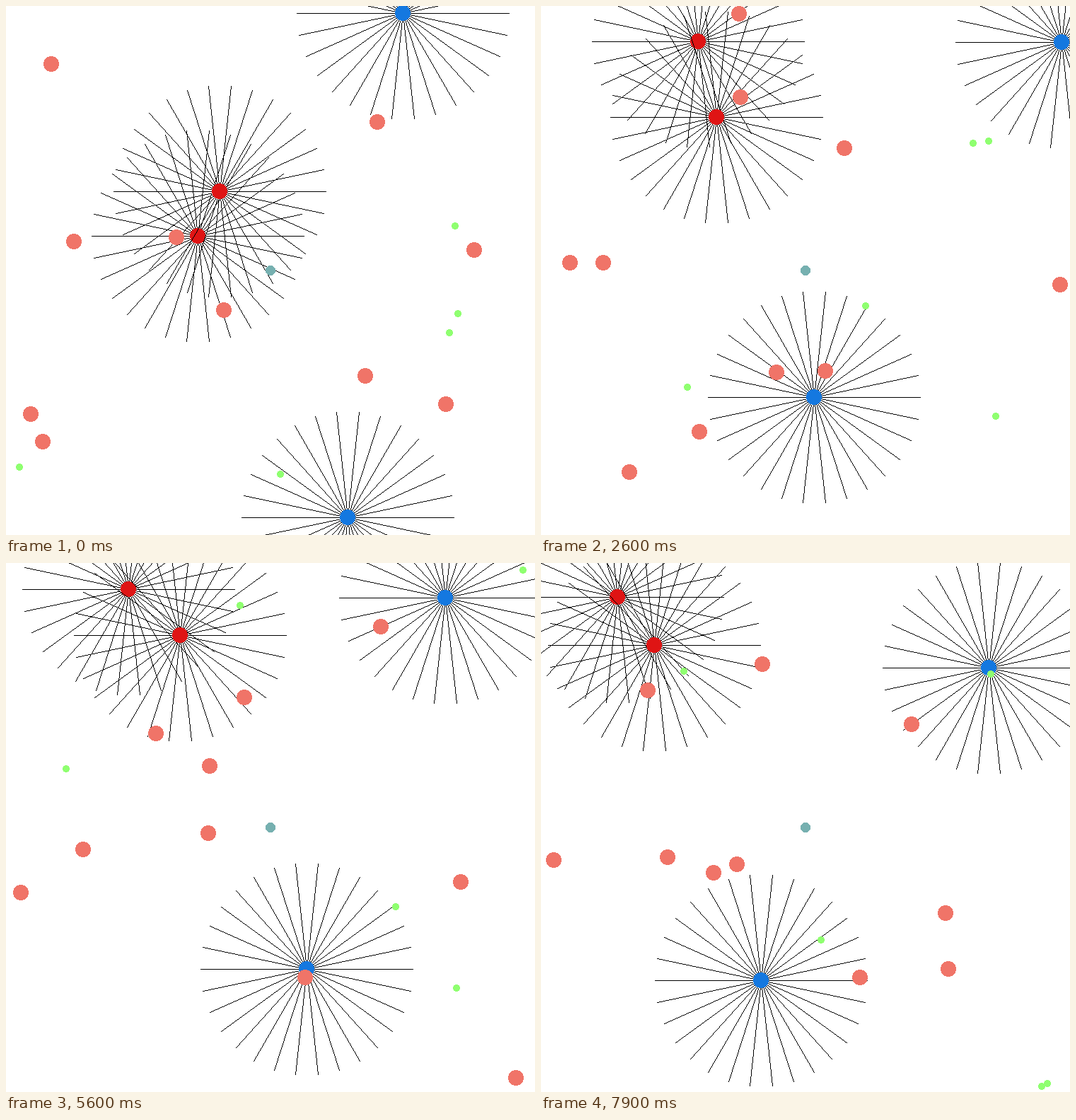
Animation of 748 by 748 pixels, one loop 8 s. Source, as a matplotlib script:

```python
import numpy as np
import matplotlib.pyplot as plt
from matplotlib.animation import FuncAnimation
from matplotlib.colors import to_rgb

SIZE, DPI = 748, 100
FRAMES, STEP_MS = 80, 100
SUBSTEPS = 2
CENTER = np.array([374.0, 374.0])
SHIELD = 75          # bounce distance around the centre dot
RAYS, REACH = 30, 150

RED, BLUE = "#df1414", "#1478e0"
SALMON, GREEN, TEAL = "#f07468", "#8fff70", "#76b0b0"

# Drifting dots: start and velocity, optionally the frame of a rebirth
# followed by the new start and velocity.
SALMON_DOTS = [
    (662, 345, 3.06, 1.9),
    (508, 523, -3.05, -12.38),
    (622, 563, -11.13, -1.74),
    (52, 616, 6.63, -0.53),
    (35, 577, -5.38, 9.23),
    (308, 430, -10.28, -2.56),
    (96, 333, 11.76, 7.05),
    (241, 327, -5.89, 1.4),
    (64, 82, 8.32, -2.72, 64, 171, 348, -10.2, 4.8),
    (525, 164, -9.36, -10.5, 28, 88, 360, 4.42, -4.26),
]
GREEN_DOTS = [
    (639, 435, -8.27, -1.11),
    (19, 652, 7.23, 11.44),
    (388, 662, 9.8, -3.14),
    (635, 311, 9.32, -4.49, 57, 574, 535, 6.1, 9.3),
    (627, 462, -11.6, 9.92, 19, 604, 236, 4.13, -6.42),
]

# Hunters glide through a few waypoints reached at shared times.
KEYS = np.array([0, 12, 26, 34, 47, 65, 79])
HUNTERS = [
    (BLUE, (561, 630, 736, 677, 652, 601, 633), (10, 20, 51, 24, 16, 99, 148)),
    (BLUE, (483, 400, 386, 355, 436, 401, 311), (723, 737, 553, 504, 609, 538, 590)),
    (RED, (271, 164, 222, 214, 142, 204, 108), (325, 179, 50, 104, 31, 45, 48)),
    (RED, (302, 246, 248, 327, 307, 184, 160), (262, 226, 157, 76, 80, 121, 116)),
]


def advance(pos, vel, radius):
    """One substep with elastic bounces off the walls and the centre shield."""
    pos = pos + vel / SUBSTEPS
    low, high = radius - 1, SIZE - radius + 1
    vel = np.where(pos < low, abs(vel), np.where(pos > high, -abs(vel), vel))
    pos = np.where(pos < low, 2 * low - pos,
                   np.where(pos > high, 2 * high - pos, pos))
    away = pos - CENTER
    dist = np.hypot(*away)
    inward = vel @ away / dist
    if dist < SHIELD + radius and inward < 0:
        vel = vel - 2 * inward * away / dist
    return pos, vel


def dot_track(spec, radius):
    births = {0: spec[:4]}
    if len(spec) > 4:
        births[spec[4]] = spec[5:]
    track = []
    for i in range(FRAMES):
        if i in births:
            pos, vel = np.array(births[i], float).reshape(2, 2)
        else:
            for _ in range(SUBSTEPS):
                pos, vel = advance(pos, vel, radius)
        track.append(pos)
    return np.rint(track).astype(int)


def glide(v):
    """Monotone cubic through the waypoints, sampled at every frame."""
    v = np.array(v, float)
    h = np.diff(KEYS)
    d = np.diff(v) / h
    m = np.concatenate([d[:1], np.zeros(len(d) - 1), d[-1:]])
    for k in range(1, len(d)):
        if d[k - 1] * d[k] > 0:
            m[k] = 2 * d[k - 1] * d[k] / (d[k - 1] + d[k])
    f = np.arange(FRAMES)
    k = np.clip(np.searchsorted(KEYS, f, side="right") - 1, 0, len(h) - 1)
    s = (f - KEYS[k]) / h[k]
    return ((1 + 2 * s) * (1 - s) ** 2 * v[k] + s * (1 - s) ** 2 * h[k] * m[k]
            + s * s * (3 - 2 * s) * v[k + 1] + s * s * (s - 1) * h[k] * m[k + 1])


def hunter_track(xs, ys):
    return np.rint(np.column_stack([glide(xs), glide(ys)])).astype(int)


def disc(radius):
    """Pixel offsets of a filled circle with an even diameter."""
    dy, dx = np.mgrid[-radius:radius, -radius:radius]
    inside = np.hypot(dx + 0.5, dy + 0.5) < radius
    return np.column_stack([dx[inside], dy[inside]])


def burst():
    """Pixel offsets of one-pixel rays around a point."""
    rays = []
    for a in 2 * np.pi * np.arange(RAYS) / RAYS:
        end = np.rint([REACH * np.cos(a), REACH * np.sin(a)])
        n = int(abs(end).max())
        rays.append(np.rint(np.outer(np.arange(n + 1) / n, end)))
    return np.concatenate(rays).astype(int)


def rgb(color):
    return np.rint(np.array(to_rgb(color)) * 255).astype(np.uint8)


def stamp(canvas, shape, at, color):
    p = shape + at
    x, y = p[((p >= 0) & (p < SIZE)).all(axis=1)].T
    canvas[y, x] = color


# Layers from back to front: (pixel offsets, colour, position per frame).
layers = []
for color, xs, ys in HUNTERS:
    track = hunter_track(xs, ys)
    layers += [(burst(), rgb("black"), track), (disc(11), rgb(color), track)]
layers.append((disc(7), rgb(TEAL), np.tile(CENTER.astype(int), (FRAMES, 1))))
for specs, color, radius in ((SALMON_DOTS, SALMON, 11), (GREEN_DOTS, GREEN, 5)):
    for spec in specs:
        layers.append((disc(radius), rgb(color), dot_track(spec, radius)))


def render(i):
    canvas = np.full((SIZE, SIZE, 3), 255, np.uint8)
    for shape, color, track in layers:
        stamp(canvas, shape, track[i], color)
    return canvas


fig = plt.figure(figsize=(SIZE / DPI, SIZE / DPI), dpi=DPI, facecolor="white")
stage = fig.figimage(render(0), origin="upper")


def draw(i):
    stage.set_data(render(i))
    stage.changed()
    return [stage]


anim = FuncAnimation(fig, draw, frames=FRAMES, interval=STEP_MS,
                     init_func=lambda: draw(0), repeat=True, repeat_delay=0)
plt.show()
```
